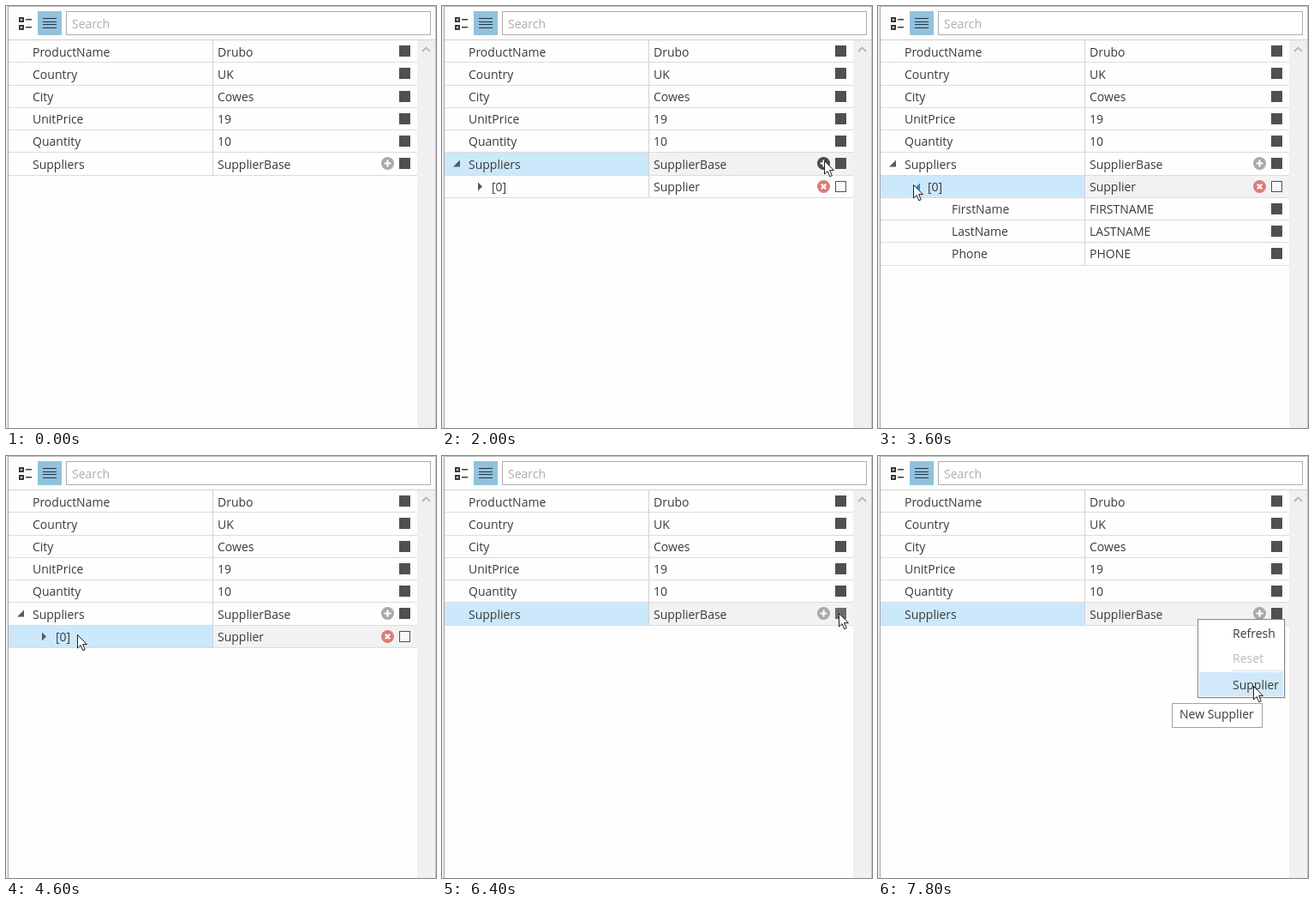
Recreate the animation shown at these times as an HTML page. Size 502x492 px, loop 8000 ms.

```html
<!DOCTYPE html>
<html lang="en">
<head>
<meta charset="utf-8">
<title>Property grid</title>
<style>
  html, body { margin: 0; width: 100%; height: 100%; overflow: hidden; background: #fefefe; }
  svg { display: block; width: 502px; height: 492px; }
  text { font: 14px "Open Sans", "Noto Sans", sans-serif; white-space: pre; }
</style>
</head>
<body>
<svg id="stage" viewBox="0 0 502 492"></svg>
<script>
const LOOP = 8000, STEP = 200;
const INK = '#505053', SELECTED = '#cce8fb';
const stage = document.getElementById('stage');

const rect = (x, y, w, h, fill) => `<rect x="${x}" y="${y}" width="${w}" height="${h}" fill="${fill}"/>`;
const frame = (x, y, w, h, stroke, fill = '#fff') =>
  `<rect x="${x + .5}" y="${y + .5}" width="${w - 1}" height="${h - 1}" fill="${fill}" stroke="${stroke}"/>`;
const label = (x, y, s, fill = '#3a3a3c') => `<text x="${x}" y="${y}" fill="${fill}">${s}</text>`;
const path = (d, fill, stroke = 'none', width = 1) =>
  `<path d="${d}" fill="${fill}" stroke="${stroke}" stroke-width="${width}"/>`;

// Pointer stops: time, x, y
const stops = [
  [800, 428, 447], [1600, 446, 180], [2200, 446, 180], [3000, 41, 208],
  [4400, 41, 208], [5400, 446, 212], [5600, 446, 212], [6400, 463, 183],
  [6800, 463, 183], [7600, 438, 268], [LOOP, 438, 268]
];

function pointerAt(t) {
  if (t < stops[0][0]) return null;
  const next = stops.findIndex(stop => stop[0] > t);
  const [t0, x0, y0] = stops[next - 1], [t1, x1, y1] = stops[next];
  const p = (t - t0) / (t1 - t0), ease = p * p * (3 - 2 * p);
  return { x: Math.round(x0 + (x1 - x0) * ease), y: Math.round(y0 + (y1 - y0) * ease) };
}

const near = (pointer, x, y, r = 8) => pointer && Math.hypot(pointer.x - x, pointer.y - y) <= r;

function rowsAt(t) {
  const hasItem = t >= 2000 && t < 5600;
  const itemOpen = t >= 3200 && t < 4400;
  const rows = [
    { name: 'ProductName', value: 'Drubo' },
    { name: 'Country', value: 'UK' },
    { name: 'City', value: 'Cowes' },
    { name: 'UnitPrice', value: '19' },
    { name: 'Quantity', value: '10' },
    { name: 'Suppliers', value: 'SupplierBase', button: 'add', arrow: hasItem && 'open',
      selected: t >= 2000 && t < 3200 || t >= 5600 }
  ];
  if (hasItem) rows.push({ name: '[0]', value: 'Supplier', level: 1, button: 'remove', hollow: true,
    arrow: itemOpen ? 'open' : 'closed', selected: t >= 3200 });
  if (itemOpen) for (const name of ['FirstName', 'LastName', 'Phone'])
    rows.push({ name, value: name.toUpperCase(), level: 2 });
  return rows;
}

function drawButton(kind, y, hover) {
  const add = kind === 'add';
  const fill = add ? (hover ? '#48484b' : '#a9a9ab') : (hover ? '#b3302d' : '#dc7c78');
  const mark = add ? `M441.5 ${y}h8m-4 -4v8` : `M442.8 ${y - 2.7}l5.4 5.4m0 -5.4l-5.4 5.4`;
  return `<circle cx="445.5" cy="${y}" r="7.5" fill="${fill}"/>` + path(mark, 'none', '#fff', 2.2);
}

function drawRow(row, i, pointer) {
  const top = Math.round(39 + 26.25 * i), bottom = Math.round(65.25 + 26.25 * i);
  const base = Math.round(58.6 + 26.2 * i), box = Math.round(46 + 26.25 * i), mid = box + 6.5;
  const indent = 28 * (row.level || 0);
  let out = '';
  if (row.selected)
    out += rect(3, top + 1, 238, bottom - top - 1, SELECTED) + rect(242, top + 1, 238, bottom - top - 1, '#f2f2f4');
  out += rect(3, bottom, 477, 1, '#dcdcde') + rect(241, top, 1, bottom - top, '#d2d2d4');
  if (row.arrow) {
    const x = 13 + indent;
    const fill = near(pointer, x + 3, mid, 6) ? '#1c8fd0' : '#5a5a5c';
    out += path(row.arrow === 'open' ? `M${x} ${mid + 4}h8v-8z` : `M${x + 1} ${mid - 5}l5 5l-5 5z`, fill);
  }
  out += label(31 + indent - (row.level ? 1 : 0), base, row.name) + label(247, base, row.value);
  if (row.button) out += drawButton(row.button, mid, near(pointer, 445.5, mid));
  return out + (row.hollow ? frame(459, box, 13, 13, INK, '#f8f8f9')
    : rect(459, box, 13, 13, near(pointer, 465.5, mid) ? '#6c6c70' : INK));
}

function drawChrome() {
  let out = rect(0, 0, 502, 492, '#fefefe') + rect(0, 0, 2, 492, '#ededee') + rect(2, 0, 1, 492, '#a8a8aa')
    + rect(2, 0, 500, 1, '#bcbcbe') + rect(501, 0, 1, 492, '#c6c6c8')
    + rect(3, 39, 498, 1, '#cfcfd1') + rect(480, 40, 21, 452, '#f0f0f2')
    + path('M486 53l4.5 -4.5l4.5 4.5', 'none', '#b8b8ba', 1.8)
    + frame(70, 6, 426, 28, '#adadaf') + label(77, 26, 'Search', '#acacae')
    + rect(37, 6, 28, 28, '#92c1de');
  for (const y of [14, 18, 21, 25]) out += rect(43, y, 16, 1, '#29343b');
  for (const y of [13, 22])
    out += path(`M16 ${y + 1}h4v4h-4z`, 'none', '#3b3b3e', 2) + rect(23, y + 2, 7, 1.5, '#3b3b3e');
  return out;
}

function drawMenu(t, pointer) {
  if (t < 6600) return '';
  const onRefresh = pointer.y > 192 && pointer.y < 221, onSupplier = pointer.y >= 252;
  let out = rect(375, 192, 101, 91, '#e2e2e4') + frame(373, 190, 102, 92, '#858587');
  if (onRefresh) out += rect(375, 192, 98, 29, '#d0e8fa');
  if (onSupplier) out += rect(375, 252, 98, 28, '#d0e8fa');
  out += label(414, 212, 'Refresh') + label(414, 241, 'Reset', '#b9b9bb')
    + rect(414, 250, 59, 1, '#dcdcde') + label(414, 272, 'Supplier');
  if (t >= 7800) out += frame(343, 288, 106, 29, '#a2a2a4') + label(352, 306, 'New Supplier');
  return out;
}

const drawPointer = p => p
  ? path(`M${p.x + .5} ${p.y + .5}v15.5l3.6 -3.4l2.7 6.2l2.5 -1.1l-2.7 -6.1h4.8z`, '#fff', '#1c1c1e') : '';

let shown = -1;
function tick(now) {
  const t = Math.floor(now % LOOP / STEP) * STEP;
  if (t !== shown) {
    shown = t;
    const pointer = pointerAt(t);
    stage.innerHTML = drawChrome() + rowsAt(t).map((row, i) => drawRow(row, i, pointer)).join('')
      + drawMenu(t, pointer) + drawPointer(pointer);
  }
  requestAnimationFrame(tick);
}
const start = performance.now();
tick(0);
function loop() { tick(performance.now() - start); }
</script>
</body>
</html>
```
